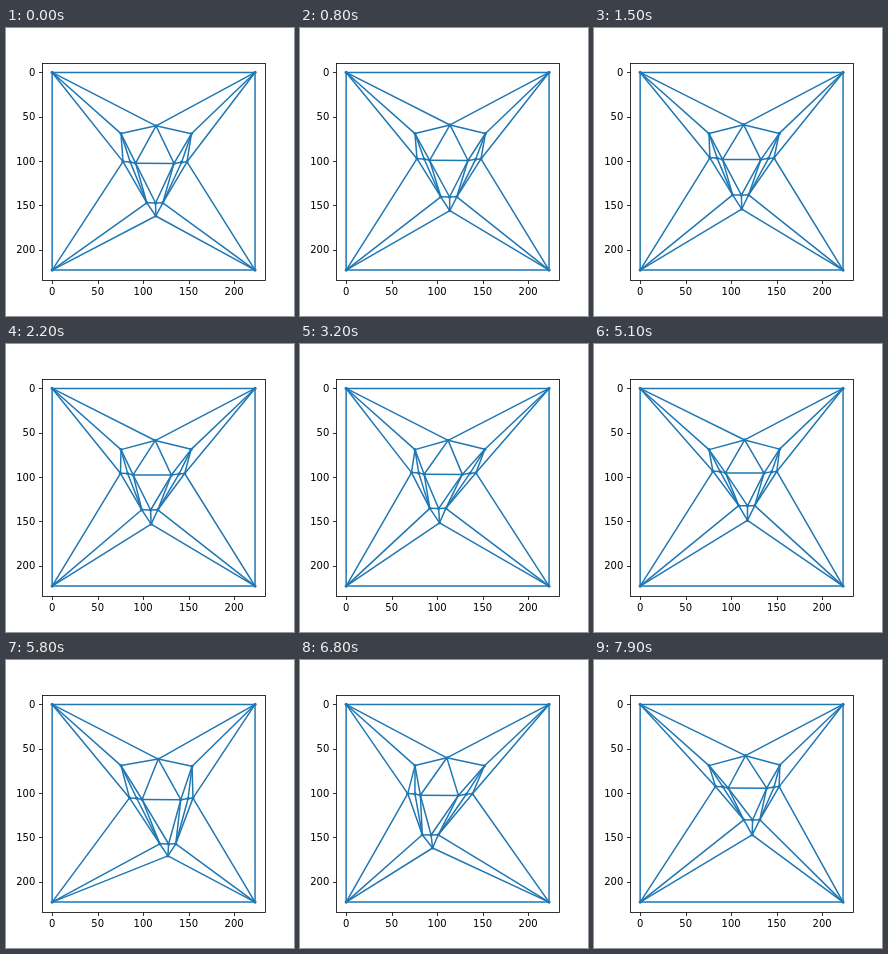
An HTML page with a canvas for the animation above (8 s loop, 288x288 px).

```html
<!DOCTYPE html>
<html lang="en">
<head>
<meta charset="utf-8">
<title>Triangle mesh</title>
<style>
  html, body { margin: 0; width: 100%; height: 100%; overflow: hidden; background: #fff; }
  canvas { display: block; width: 288px; height: 288px; }
</style>
</head>
<body>
<canvas id="stage" width="288" height="288"></canvas>
<script>
const ctx = document.getElementById('stage').getContext('2d');
const LOOP = 8000, STEP = 100;
const BLUE = '#1f77b4';

// Rest position, then how strongly the point follows the sway in x and y.
const points = {
  A: [46.15, 44.44, 0, 0],
  B: [249.05, 44.44, 0, 0],
  C: [249.05, 242.1, 0, 0],
  D: [46.15, 242.1, 0, 0],
  tl: [115, 105.6, 0, 0],
  t: [150, 97.8, 0.17, 0.14],
  tr: [185.4, 105.8, 0.05, 0.05],
  l1: [117, 133.6, 0.5, 0.48],
  l2: [124.2, 133.9, 0.5, 0.48],
  l3: [129.6, 135.2, 0.5, 0.48],
  r3: [168, 135.4, 0.52, 0.48],
  r2: [175.6, 134.2, 0.5, 0.48],
  r1: [181, 133.8, 0.46, 0.48],
  b1: [140.8, 174.8, 1, 1],
  b2: [149.6, 175, 1, 1],
  b3: [156.8, 174.8, 1, 1],
  c: [149.8, 188, 0.93, 0.88]
};

const links = {
  A: 'B D t tl l1',
  B: 'C t tr r1',
  C: 'D c b3 r1',
  D: 'l1 b1 c',
  tl: 't l1 l2 l3',
  tr: 't r1 r2 r3',
  t: 'l3 r3',
  l1: 'l2 b1',
  l2: 'l3 b1',
  l3: 'r3 b1 b2',
  r3: 'r2 b2 b3',
  r2: 'r1 b3',
  r1: 'b3',
  b2: 'b1 b3',
  c: 'b1 b2 b3'
};

// Sway: time in seconds, x, y. A slow drift, then a clockwise roll.
const sway = [
  [0, 0, 0], [0.8, 0, -6], [2.2, -5, -9], [4.3, -14, -12],
  [5.05, 3, -14], [5.8, 13, 9], [6.3, -4, 13], [6.8, -18.5, 0],
  [7.35, -8, -14], [7.9, 9, -15]
];

function slope(i, axis) {
  const a = sway[Math.max(i - 1, 0)];
  const b = sway[Math.min(i + 1, sway.length - 1)];
  return (b[axis] - a[axis]) / (b[0] - a[0]);
}

function swayAt(s, axis) {
  let i = 0;
  while (i < sway.length - 2 && s > sway[i + 1][0]) i++;
  const p = sway[i], q = sway[i + 1], d = q[0] - p[0];
  const u = (s - p[0]) / d, u2 = u * u, u3 = u2 * u;
  return (2 * u3 - 3 * u2 + 1) * p[axis] + (u3 - 2 * u2 + u) * d * slope(i, axis)
    + (3 * u2 - 2 * u3) * q[axis] + (u3 - u2) * d * slope(i + 1, axis);
}

function line(x1, y1, x2, y2) {
  ctx.beginPath();
  ctx.moveTo(x1, y1);
  ctx.lineTo(x2, y2);
  ctx.stroke();
}

function drawMesh(s) {
  const dx = swayAt(s, 1), dy = swayAt(s, 2);
  const at = {};
  for (const name in points) {
    const [x, y, kx, ky] = points[name];
    at[name] = [x + kx * dx, y + ky * dy];
  }
  ctx.strokeStyle = ctx.fillStyle = BLUE;
  ctx.lineWidth = 1.5;
  ctx.lineCap = 'round';
  for (const from in links) {
    for (const to of links[from].split(' ')) line(...at[from], ...at[to]);
  }
  for (const [x, y] of Object.values(at)) {
    ctx.beginPath();
    ctx.arc(x, y, 1.6, 0, Math.PI * 2);
    ctx.fill();
  }
}

function drawAxes() {
  ctx.strokeStyle = ctx.fillStyle = '#000';
  ctx.lineWidth = 0.8;
  ctx.lineCap = 'butt';
  ctx.strokeRect(36.5, 35.5, 223, 217);
  ctx.font = '10px "DejaVu Sans", sans-serif';
  ctx.textBaseline = 'alphabetic';
  for (let v = 0; v <= 200; v += 50) {
    const x = 46.15 + v * 0.9099, y = 44.44 + v * 0.8864;
    const sx = Math.round(x) + 0.5, sy = Math.round(y) + 0.5;
    line(sx, 252.5, sx, 256);
    line(33, sy, 36.5, sy);
    ctx.textAlign = 'center';
    ctx.fillText(v, x, 267);
    ctx.textAlign = 'right';
    ctx.fillText(v, 29.3, Math.round(y + 3.7));
  }
}

function frame(now) {
  const ms = Math.floor((now % LOOP) / STEP) * STEP;
  ctx.fillStyle = '#fff';
  ctx.fillRect(0, 0, 288, 288);
  drawMesh(ms / 1000);
  drawAxes();
}

const start = performance.now();
function tick() {
  frame(performance.now() - start);
  requestAnimationFrame(tick);
}
tick();
</script>
</body>
</html>
```
